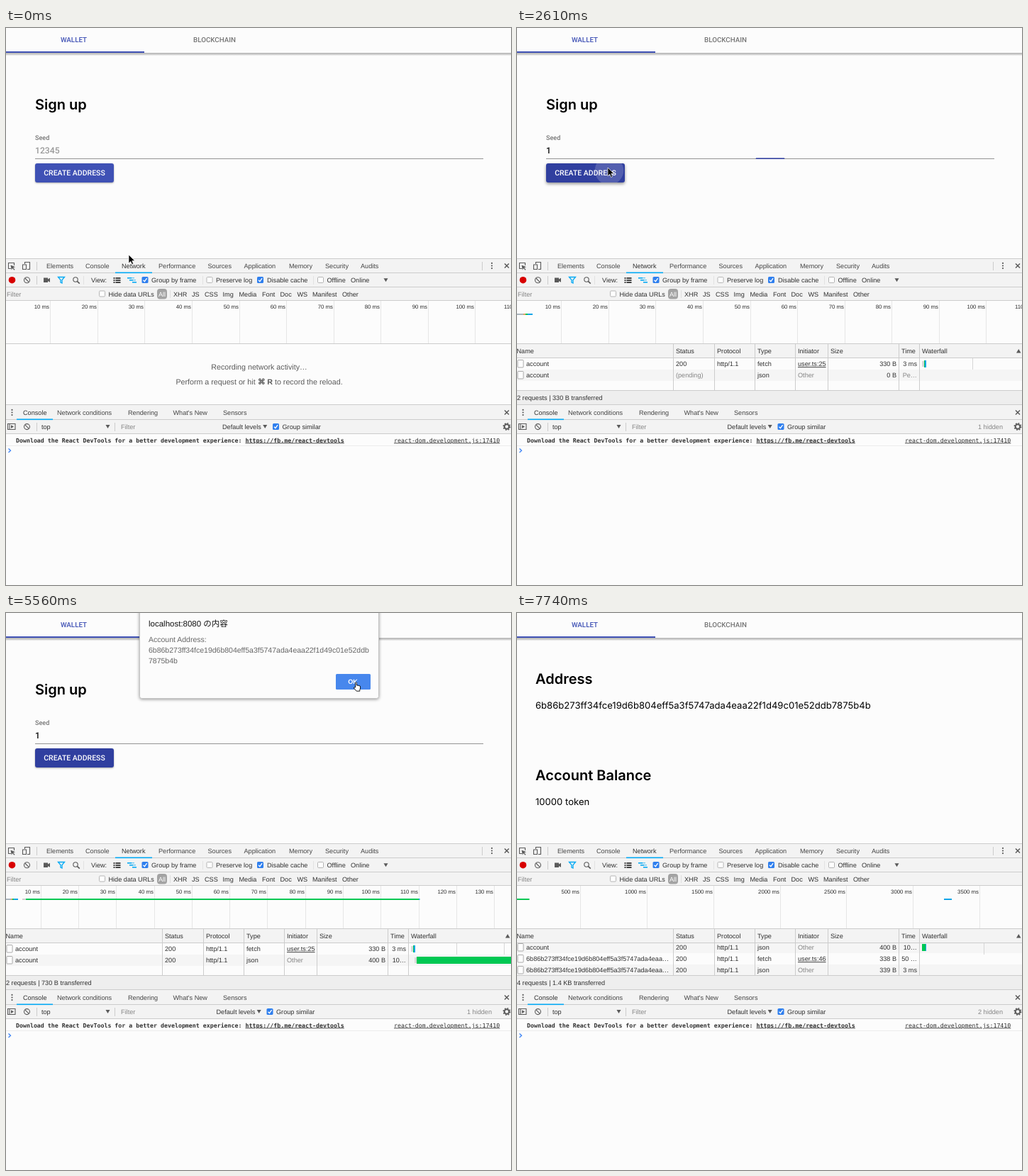
Write an HTML page that moves like this. It is 712x786 px and loops after 8260 ms.

```html
<!DOCTYPE html>
<html lang="en">
<head>
<meta charset="utf-8">
<title>Wallet sign up</title>
<style>
html, body { margin: 0; width: 100%; height: 100%; overflow: hidden; background: #fcfcfc; }
svg { display: block; width: 100vw; height: 100vh; }
text { font: 9.15px "Liberation Sans", sans-serif; fill: #303030; white-space: pre; text-rendering: geometricPrecision; }
.tab { font: 500 9.8px Roboto, sans-serif; fill: #757575; text-anchor: middle; }
.btn { font: 500 10.5px Roboto, sans-serif; fill: #fff; text-anchor: middle; }
.label { font: 500 9.1px Roboto, sans-serif; fill: #757575; }
.input { font: 500 12.2px Roboto, sans-serif; fill: #111; }
.head { font: 600 20px Inter, sans-serif; fill: #000; }
.body { font: 13.08px Inter, sans-serif; fill: #000; }
.panel { fill: #444; }
.gray { fill: #858585; }
.end { text-anchor: end; }
.mid { text-anchor: middle; }
.link { text-decoration: underline; }
.tick { font-size: 7.8px; text-anchor: end; }
.hint { font-size: 10.7px; fill: #5a5a5a; text-anchor: middle; }
.mono { font: 8.28px "DejaVu Sans Mono", monospace; }
.bold { font-weight: bold; }
.title { font: 11.5px "Liberation Sans", "Noto Sans CJK JP", "Noto Sans CJK", sans-serif; fill: #111; }
.note { font-size: 10.5px; fill: #666; }
.icon { fill: none; stroke: #5a5a5a; stroke-width: 1.1; }
.lift { filter: drop-shadow(0 1.3px 1.2px rgba(0,0,0,.32)); }
.pressed { filter: drop-shadow(0 2px 2px rgba(0,0,0,.42)); }
.pop { filter: drop-shadow(0 1px 2px rgba(0,0,0,.4)); }
</style>
</head>
<body>
<svg id="stage" viewBox="0 0 712 786" preserveAspectRatio="none"></svg>
<script>
const LOOP = 8260;
const BLUE = '#3f51b5', DARK = '#303f9f', ACCENT = '#03a9f4', GREEN = '#00c853', SKY = '#12a5e8';
const BAR = '#f3f3f3', EDGE = '#cccccc';
const HASH = '6b86b273ff34fce19d6b804eff5a3f5747ada4eaa22f1d49c01e52ddb7875b4b';

const text = (x, y, s, cls = '', extra = '') => `<text x="${x}" y="${y}" class="${cls}" ${extra}>${s}</text>`;
const rect = (x, y, w, h, fill, extra = '') => `<rect x="${x}" y="${y}" width="${w}" height="${h}" fill="${fill}" ${extra}/>`;
const path = (d, extra = 'class="icon"') => `<path d="${d}" ${extra}/>`;
const group = (id, inner) => `<g id="${id}">${inner}</g>`;
const hline = (y, c = EDGE) => rect(0, y, 712, 1, c);
const vline = (x, y, h, c = EDGE) => rect(x, y, 1, h, c);
const labels = (y, items, cls) => items.map(([x, s]) => text(x, y, s, cls)).join('');
const down = (x, y) => path(`M${x - 3} ${y - 2.5}h6l-3 5z`, 'fill="#5a5a5a"');
const cross = (x, y) => path(`M${x - 3} ${y - 3}l6 6m0-6l-6 6`, 'class="icon" style="stroke-width:1.5"');
const dots = (x, y) => [-3.6, 0, 3.6].map(d => `<circle cx="${x}" cy="${y + d}" r="1.1" fill="#5a5a5a"/>`).join('');
const ban = (x, y) => `<circle cx="${x}" cy="${y}" r="4" class="icon"/>` + path(`M${x - 2.8} ${y - 2.8}l5.6 5.6`);
const check = (x, y, on) => on
  ? rect(x, y, 9, 9, '#2f7fee', 'rx="1.6"') + path(`M${x + 2} ${y + 4.7}l1.9 2 3.2-4.6`, 'fill="none" stroke="#fff" stroke-width="1.3"')
  : rect(x + .5, y + .5, 8, 8, '#fff', 'rx="1.3" stroke="#b5b5b5"');

function appBar() {
  return rect(0, 35, 712, 4, 'url(#shade)') + rect(0, 33, 195, 2, BLUE) +
    text(95.5, 20.4, 'WALLET', 'tab', `style="fill:${BLUE}"`) + text(294, 20.4, 'BLOCKCHAIN', 'tab');
}

function signUp() {
  return text(41, 115, 'Sign up', 'head') +
    text(41, 157.6, 'Seed', 'label', 'id="seed"') +
    text(41, 177.3, '12345', 'input', 'id="value"') +
    rect(48, 165, 1, 15, '#000', 'id="caret"') +
    rect(41, 184, 632, 1, '#949494') + rect(41, 183.4, 632, 1.6, DARK, 'id="focus"') +
    rect(41, 191, 111, 27, BLUE, 'id="create" rx="3"') +
    '<circle id="ripple" cx="130" cy="201" fill="#fff" clip-path="url(#button)"/>' +
    text(96.5, 207.6, 'CREATE ADDRESS', 'btn');
}

function account() {
  return text(26, 100, 'Address', 'head') + text(26, 135.4, HASH, 'body') +
    text(26, 236, 'Account Balance', 'head') + text(26, 271, '10000 token', 'body');
}

function alertBox() {
  return rect(188.5, -8, 337, 128.5, '#fcfcfc', 'rx="3" class="pop" stroke="#c4c4c4"') +
    text(201, 18.6, 'localhost:8080 の内容', 'title') + text(201, 40.7, 'Account Address:', 'note') +
    text(201, 55.7, HASH.slice(0, 57), 'note') + text(201, 71, HASH.slice(57), 'note') +
    rect(465, 86, 49, 22, '#4285f4', 'id="ok" rx="1.5"') +
    text(489, 100.4, 'OK', 'mid bold', 'style="fill:#fff"');
}

function toolbars() {
  const funnel = path('M73.5 351.5h9l-3.5 4v4.5l-2-1v-3.5z', `fill="none" stroke="${ACCENT}" stroke-width="1.3"`);
  const list = [0, 3, 6].map(d => rect(151.5, 352 + d, 2, 2, '#444') + rect(154.5, 352 + d, 7, 2, '#444')).join('');
  const flow = [[171, 0, 6], [174, 3, 5], [178, 6, 6]].map(([x, d, w]) => rect(x, 352 + d, w, 1.6, ACCENT)).join('') +
    path('M177 352.8h4M179 355.8h4', `stroke="${ACCENT}" stroke-width=".8"`);
  return rect(0, 325, 712, 60, BAR) + [325, 345, 365, 384].map(y => hline(y)).join('') +
    path('M11.5 335v-3.5h-8v8h3.5') + path('M6.5 334.5l6.5 2.7-2.8 1 2.3 2.6-1 .9-2.3-2.7-1.4 2.4z', 'fill="#5a5a5a"') +
    path('M26.5 333v-2.5h7v10h-3.5M23.5 334h5v6.5h-5z') + vline(43, 330, 12) +
    labels(339, [[57, 'Elements'], [112, 'Console'], [215, 'Performance'], [284.5, 'Sources'],
      [335.5, 'Application'], [399, 'Memory'], [450, 'Security'], [500, 'Audits']], 'panel') + text(163, 339, 'Network') +
    rect(154, 344.5, 52, 1.6, ACCENT) + vline(671, 330, 12) + dots(685, 335.5) + cross(706, 335.5) +
    '<circle cx="8.5" cy="355.7" r="4.8" fill="#d80000"/>' + ban(29.5, 355.8) + vline(43, 350, 12) +
    path('M53 352.5h6v2l3-1.7v6l-3-1.7v2h-6z', 'fill="#5a5a5a"') + funnel +
    '<circle cx="98" cy="355" r="3.2" class="icon"/>' + path('M100.3 357.4l3.5 3.3', 'class="icon" style="stroke-width:1.6"') +
    vline(109, 350, 12, '#e2e2e2') + list + flow +
    check(191.5, 351, true) + check(282.5, 351) + check(354, 351, true) + check(439, 351) +
    labels(359, [[120, 'View:'], [205, 'Group by frame'], [296, 'Preserve log'], [368, 'Disable cache'],
      [452.5, 'Offline'], [486, 'Online']]) + vline(277, 350, 12, '#e2e2e2') + vline(433, 350, 12, '#e2e2e2') + down(535.5, 355.8) +
    text(1, 379, 'Filter', 'gray') + check(131, 370.5) + text(144.5, 379, 'Hide data URLs') +
    rect(213, 368, 14, 14.5, '#a3a3a3', 'rx="4"') + text(220, 379, 'All', 'mid', 'style="fill:#fff"') + vline(231, 370, 11, '#ddd') +
    labels(379, [[236, 'XHR'], [262, 'JS'], [280, 'CSS'], [305.5, 'Img'], [328.5, 'Media'], [361, 'Font'],
      [386.5, 'Doc'], [410.5, 'WS'], [432, 'Manifest'], [474, 'Other']]);
}

function drawer() {
  return rect(0, 532, 712, 40, BAR) + [531, 552, 572].map(y => hline(y)).join('') +
    dots(8.5, 542.5) + text(24, 545.5, 'Console') + labels(545.5, [[72, 'Network conditions'], [172, 'Rendering'],
      [235.5, 'What\'s New'], [306, 'Sensors']], 'panel') + rect(15, 551.5, 51, 1.6, ACCENT) + cross(706, 542.5) +
    path('M2.5 558.5h10.5v8h-10.5zM5 558.5v8') + path('M7 560.3l4 2.3-4 2.3z', 'fill="#5a5a5a"') +
    ban(29.5, 562.6) + vline(43, 557, 12) + text(50, 566, 'top') + down(143.5, 562.6) + vline(153, 557, 12) +
    text(162, 566, 'Filter', 'gray') +
    group('levels', text(305, 566, 'Default levels') + down(365.2, 562.6) + check(376, 558, true) + text(389.5, 566, 'Group similar')) +
    text(685, 566, '', 'gray end', 'id="hidden"') +
    '<circle cx="706" cy="562.5" r="3.3" class="icon" style="stroke-width:2"/>' +
    '<circle cx="706" cy="562.5" r="4.7" class="icon" style="stroke-width:1.6;stroke-dasharray:1.8 1.89"/>' +
    text(14, 584.5, 'Download the React DevTools for a better development experience: <tspan class="link">https://fb.me/react-devtools</tspan>', 'mono bold') +
    text(547, 584.5, 'react-dom.development.js:17410', 'mono link') + hline(589, '#ececec') +
    path('M3.5 593.5l3 2.8-3 2.8', 'fill="none" stroke="#3b82f6" stroke-width="1.3"');
}

function timeline(first, step, unit, bars) {
  let out = '';
  for (let i = 0; first + step * i < 740; i++) {
    const x = Math.floor(first + step * i);
    out += vline(x, 385, 60, '#e6e6e6') + text(x - 1, 396, unit * (i + 1) + ' ms', 'tick');
  }
  return out + bars.map(([x, w, c]) => rect(x, 403, w, 2, c)).join('') + hline(445);
}

function table(rows, scroll, footer, grid, bars) {
  const cols = [[220, 'Status'], [278, 'Protocol'], [335, 'Type'], [392, 'Initiator'], [438, 'Size'], [538, 'Time'], [567, 'Waterfall']];
  const body = rows.map(([name, status, proto, type, from, size, time], i) => {
    const y = 466 + 16 * i - scroll, b = y + 11.2, dim = status === '200' ? '' : 'gray';
    return (i % 2 ? rect(0, y, 712, 16, '#f5f5f5') : '') +
      rect(1, y + 2.5, 8, 10.5, '#fff', 'rx=".8" stroke="#a8a8a8"') + text(13, b, name) +
      text(224, b, status, dim) + text(282, b, proto) + text(339, b, type) +
      text(396, b, from, from === 'Other' ? 'gray' : 'link') + text(535, b, size, 'end') + text(564, b, time, 'end ' + dim);
  }).join('');
  return `<g clip-path="url(#rows)">${body}${grid.map(x => vline(x, 466, 16, '#d6d6d6')).join('')}` +
    bars.map(b => rect(...b)).join('') + '</g>' + rect(0, 446, 712, 19, BAR) + hline(465) + text(-.5, 459, 'Name') +
    cols.map(([x, s]) => vline(x, 446, 66) + text(x + 4, 459, s)).join('') +
    path('M704 458.5h6.5l-3.25-5.5z', 'fill="#5a5a5a"') +
    rect(0, 512, 712, 19, '#eeeeee') + hline(511) + text(0, 525, footer);
}

const fetched = ['account', '200', 'http/1.1', 'fetch', 'user.ts:25', '330 B', '3 ms'];
const posted = ['account', '200', 'http/1.1', 'json', 'Other', '400 B', '10…'];
const pending = ['account', '(pending)', '', 'json', 'Other', '0 B', 'Pe…'];
const short = HASH.slice(0, 41) + '…';
const startBar = [[571, 470, 3, 8, '#d9d9d9'], [574, 469, 1, 10, GREEN], [575, 469, 2, 10, SKY]];

const network = [
  timeline(62.8, 66.55, 10, []) + text(357, 482, 'Recording network activity…', 'hint') +
    text(357, 503, 'Perform a request or hit <tspan class="bold">⌘ R</tspan> to record the reload.', 'hint'),
  timeline(62.8, 66.55, 10, [[0, 9, '#a9b5bd'], [9, 3, '#e0a060'], [12, 3, GREEN], [15, 7, SKY]]) +
    table([fetched, pending], 0, '2 requests | 330 B transferred', [642], startBar),
  timeline(49.3, 53.27, 10, [[0, 7, '#a9b5bd'], [7, 2, '#e0a060'], [9, 2, GREEN], [11, 6, SKY], [23, 5, '#cfcfcf'], [28, 554, GREEN], [582, 1.5, SKY]]) +
    table([fetched, posted], 0, '2 requests | 730 B transferred', [635, 702],
      [...startBar, [576, 486, 3, 8, '#d9d9d9'], [579, 485, 133, 10, GREEN]]),
  timeline(89.9, 93.7, 500, [[0, 17.5, GREEN], [602, 11, SKY]]) +
    table([fetched, posted, [short, '200', 'http/1.1', 'fetch', 'user.ts:46', '338 B', '50 …'],
      [short, '200', 'http/1.1', 'json', 'Other', '339 B', '3 ms']], 18, '4 requests | 1.4 KB transferred', [658],
      [[571, 467, 5, 10, GREEN], [576, 467, 1, 10, SKY]]) + rect(711, 482, 1, 26, '#666', 'id="thumb"')
];

const arrow = path('M0 0v12l2.8-2.6 1.8 4.2 2-.9-1.8-4.1h3.9z', 'id="arrow" stroke="#fff" stroke-width=".7"');
const beam = path('M-2.5-7q2 0 2.5 1.2q.5-1.2 2.5-1.2M0-6v12M-2.5 7q2 0 2.5-1.2q.5 1.2 2.5 1.2M-1.5 2h3', 'id="beam" fill="none" stroke="#222"');
const hand = path('M2.6 8V1.2q.9-1.4 1.8 0V5q3 0 5 1.2q.8 3-.6 5.3v1.7H4.2L.4 9q0-1.6 1.3-1z', 'id="hand" fill="#fff" stroke="#000" stroke-width=".9"');

const stage = document.getElementById('stage');
stage.innerHTML = `<defs>
  <linearGradient id="shade" x2="0" y2="1"><stop stop-color="#b4b4b4"/><stop offset=".5" stop-color="#c8c8c8"/><stop offset="1" stop-color="#f6f6f6"/></linearGradient>
  <clipPath id="button"><rect x="41" y="191" width="111" height="27" rx="3"/></clipPath>
  <clipPath id="rows"><rect y="466" width="712" height="46"/></clipPath></defs>` +
  rect(0, 0, 712, 786, '#fcfcfc') + appBar() + group('signup', signUp()) + group('account', account()) +
  toolbars() + network.map((n, i) => group('net' + i, n)).join('') + drawer() +
  group('alert', alertBox()) + group('cursor', arrow + beam + hand);

const $ = id => document.getElementById(id);
const show = (id, on) => $(id).setAttribute('display', on ? 'inline' : 'none');
const set = (id, attrs) => { for (const k in attrs) $(id).setAttribute(k, attrs[k]); };
const clamp = v => Math.min(1, Math.max(0, v));
const easeOut = p => 1 - (1 - clamp(p)) ** 3;

const ticks = [0, 240, 450, 720, 840, 1020, 1140, 1280, 1400, 1520, 1760, 1990, 2110, 2230, 2340, 2460, 2610, 2910,
  3060, 3600, 3710, 3950, 4070, 4310, 4490, 4610, 4720, 4840, 5560, 5710, 5830, 6490, 6630];
const trail = [[0, 173, 320], [240, 183, 295], [450, 197, 272], [720, 185, 238], [840, 173, 204], [1140, 149, 165],
  [1760, 149, 165], [1990, 146, 171], [2230, 129, 194], [2340, 128, 197], [3060, 128, 197], [3600, 240, 150],
  [3710, 340, 107], [3950, 405, 98], [4070, 440, 97], [4310, 473, 97], [4490, 481, 97], [4840, 489, 96.5],
  [5560, 490, 97], [5710, 492, 96], [LOOP, 492, 96]];

function cursorAt(t) {
  const i = trail.findIndex(p => p[0] > t);
  const [t0, x0, y0] = trail[i - 1], [t1, x1, y1] = trail[i];
  const k = (t - t0) / (t1 - t0);
  return [x0 + (x1 - x0) * k, y0 + (y1 - y0) * k];
}

function draw(time) {
  const t = ticks.filter(v => v <= time).pop();
  const within = (a, b) => t >= a && t < b;

  const done = t >= 5830, focused = within(1250, 2490), typed = t >= 1760, pressed = within(2460, 3060);
  show('signup', !done);
  show('account', done);
  show('alert', within(2910, 5710));
  set('ok', { fill: t >= 4490 ? '#4787ed' : '#4285f4' });

  $('seed').style.fill = focused ? DARK : '#757575';
  $('value').textContent = typed ? '1' : '12345';
  $('value').style.fill = typed ? '#111' : '#9a9a9a';
  show('caret', focused);
  set('caret', { x: typed ? 48 : 41 });
  const line = 632 * (easeOut((t - 1250) / 200) - easeOut((t - 2490) / 200));
  set('focus', { x: 357 - line / 2, width: line });
  set('create', { fill: t >= 2230 ? DARK : BLUE, class: pressed ? 'pressed' : 'lift' });
  show('ripple', pressed);
  set('ripple', { r: Math.max(0, 9 + (t - 2460) * .075 + Math.max(0, t - 2610) * .22), opacity: t < 2910 ? .17 : .08 });

  const net = done ? 3 : t >= 2910 ? 2 : t >= 2610 ? 1 : 0;
  network.forEach((_, i) => show('net' + i, i === net));
  show('thumb', t < 6630);
  set('levels', { transform: `translate(${net ? -8.5 : 0})` });
  $('hidden').textContent = net ? (net === 3 ? 2 : 1) + ' hidden' : '';

  const [x, y] = cursorAt(t);
  const shape = within(1140, 2110) ? 'beam' : within(4610, 5710) ? 'hand' : 'arrow';
  show('cursor', t < 6490);
  set('cursor', { transform: `translate(${x} ${y})` });
  for (const s of ['arrow', 'beam', 'hand']) show(s, s === shape);
}

function loop() {
  draw(performance.now() % LOOP);
  requestAnimationFrame(loop);
}
loop();
</script>
</body>
</html>
```
